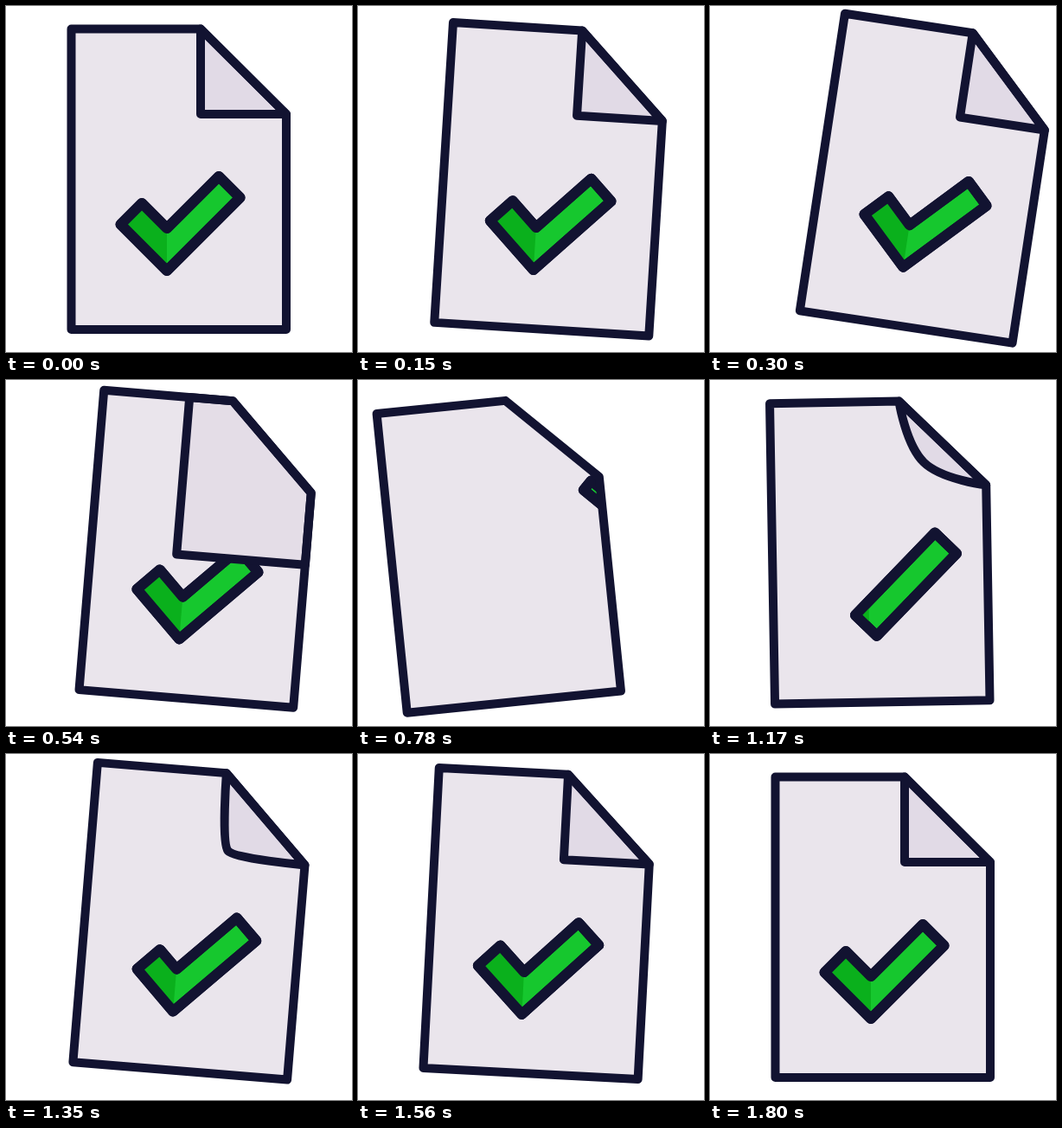
Write an HTML page with a canvas that moves like this. It is 400x400 px and loops after 1830 ms.

```html
<!DOCTYPE html>
<html lang="en">
<head>
<meta charset="utf-8">
<title>Page turn with check mark</title>
<style>
  html, body { margin: 0; width: 100%; height: 100%; overflow: hidden; background: #fff; }
  canvas { display: block; width: 400px; height: 400px; }
</style>
</head>
<body>
<canvas id="stage"></canvas>
<script>
const LOOP = 1830, STEP = 30;
const TURN_START = 420, TURN_END = 725, MARK_END = 1500;
const INK = '#121331', PAPER = '#eae5ec', FLAP = '#e1dae6';
const GREEN = '#16c72e', SHADE = '#0ab01c';

const canvas = document.getElementById('stage');
const ctx = canvas.getContext('2d');
const ratio = window.devicePixelRatio || 1;
canvas.width = canvas.height = 400 * ratio;

// Page coordinates are relative to the page centre.
const L = -124.5, R = 124, T = -173.5, B = 174, CUT_X = 25, CUT_Y = -75;

// The mark runs from its tip down to the elbow, then up the short arm, at 45 degrees.
const ELBOW_X = -14, ELBOW_Y = 81.5, LONG = 72.3, SHORT = 41.2, HALF = 12.25;

const mix = (a, b, u) => a + (b - a) * u;
const ease = (t, from, to) => {
  const u = Math.min(1, Math.max(0, (t - from) / (to - from)));
  return (1 - Math.cos(Math.PI * u)) / 2;
};

// Sum of eased swings, each given as [from, to, amount].
const sway = (...swings) => t =>
  swings.reduce((sum, [from, to, by]) => sum + by * ease(t, from, to), 0);

const angle = sway([0, 345, 9], [370, 859, -15.8], [943, 1404, 11.9], [1410, 1750, -5.1]);
const shiftX = sway([0, 328, 54], [354, 830, -93.5], [873, 1371, 55.5], [1380, 1770, -16]);
const shiftY = sway([200, 540, -5], [560, 1000, 8], [1010, 1350, -10], [1400, 1770, 7]);

function polygon(points) {
  const path = new Path2D();
  points.forEach(([x, y]) => path.lineTo(x, y));
  path.closePath();
  return path;
}

const pagePath = polygon([[L, T], [CUT_X, T], [R, CUT_Y], [R, B], [L, B]]);

function fill(path, color) {
  ctx.fillStyle = color;
  ctx.fill(path);
}

function paint(path, color, width = 10) {
  fill(path, color);
  ctx.lineWidth = width;
  ctx.stroke(path);
}

// head and tail: how far each end still has to travel along the mark.
function markPath(head, tail) {
  const at = (x, y) => [ELBOW_X + x, ELBOW_Y + y];
  const tip = LONG + tail, end = head - SHORT;
  const points = [at(tip - HALF, -tip - HALF), at(tip + HALF, -tip + HALF)];
  if (end > -HALF) {
    points.push(at(end + HALF, HALF - end), at(end - HALF, -HALF - end));
  } else {
    points.push(at(0, 2 * HALF), at(end - HALF, end + HALF),
      at(end + HALF, end - HALF), at(0, -2 * HALF));
  }
  return polygon(points);
}

function drawMark(t) {
  let head = 0, tail = 0;
  if (t > TURN_END) {
    const left = Math.max(0, MARK_END - t) / 480;
    head = 78 * left ** 1.95;
    tail = 34 * left ** 1.72;
    if (head - tail > LONG + SHORT) return;
  }
  const path = markPath(head, tail);
  ctx.save();
  ctx.clip(pagePath);
  paint(path, GREEN, 12);
  ctx.save();
  ctx.clip(path);
  ctx.fillStyle = SHADE;
  ctx.fillRect(L, T, ELBOW_X - L, B - T);
  ctx.restore();
  ctx.stroke(path);
  ctx.restore();
}

// The flap spreads until it covers the whole page.
function drawTurn(p) {
  const x = mix(CUT_X, L, p), y = mix(CUT_Y, B, p);
  const path = polygon([[x, T], [CUT_X, T], [R, CUT_Y], [R, y], [x, y]]);
  fill(path, PAPER);
  ctx.globalAlpha = 1 - p;
  fill(path, FLAP);
  ctx.globalAlpha = 1;
  ctx.stroke(path);
}

// A new flap bends in from the cut corner.
function drawBend(q) {
  const x = mix((CUT_X + R) / 2, CUT_X, q), y = mix((T + CUT_Y) / 2, CUT_Y, q);
  const h = 33 * (1 - q) ** 0.8;
  const path = new Path2D();
  path.moveTo(CUT_X, T);
  path.bezierCurveTo(CUT_X, T, x - h, y - h, x, y);
  path.bezierCurveTo(x + h, y + h, R, CUT_Y, R, CUT_Y);
  path.closePath();
  paint(path, FLAP);
}

function draw(t) {
  ctx.setTransform(ratio, 0, 0, ratio, 0, 0);
  ctx.fillStyle = '#fff';
  ctx.fillRect(0, 0, 400, 400);
  ctx.translate(200 + shiftX(t), 200 + shiftY(t));
  ctx.rotate(angle(t) * Math.PI / 180);
  ctx.lineJoin = 'round';
  ctx.strokeStyle = INK;

  fill(pagePath, PAPER);
  drawMark(t);
  ctx.lineWidth = 10;
  if (t < TURN_END) drawTurn(ease(t, TURN_START, TURN_END));
  else if (t > 840) drawBend(ease(t, 840, 1550));
  ctx.stroke(pagePath);
}

const start = performance.now();
function tick() {
  const t = (performance.now() - start) % LOOP;
  draw(Math.floor(t / STEP) * STEP);
  requestAnimationFrame(tick);
}
tick();
</script>
</body>
</html>
```
